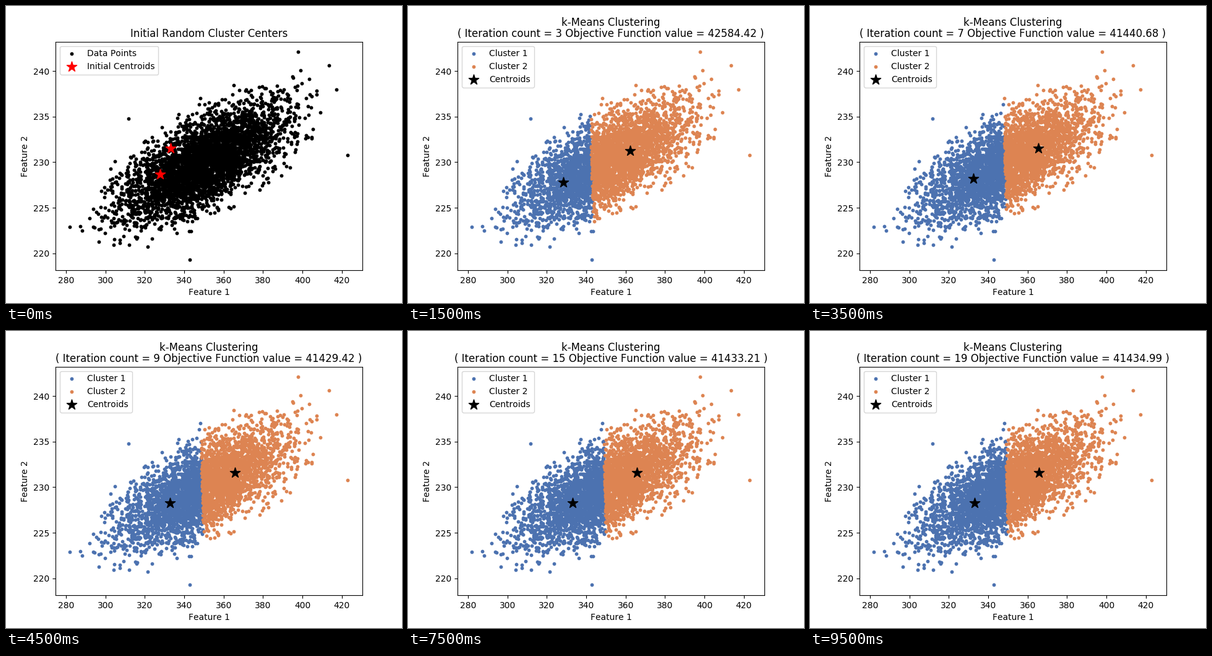
A matplotlib script for the animation above (10 s loop, 640 by 480 pixels).

```python
import numpy as np
import matplotlib.pyplot as plt
from matplotlib.animation import FuncAnimation

FRAMES, INTERVAL = 20, 500
BLUE, ORANGE = "#4C72B0", "#DD8452"

# Stray points that stand clear of the cloud
STRAYS = [(281.8, 222.9), (311.6, 234.8), (342.7, 219.3), (397.9, 242.1),
          (398.9, 240.1), (413.6, 240.6), (417.1, 238.0), (423.0, 230.8)]

# Each centroid closes a constant share of its gap per iteration
INITIAL = np.array([(327.8, 228.7), (333.0, 231.55)])
SETTLED = np.array([(333.0, 228.3), (365.75, 231.6)])
FIRST_GAP = np.array([(-12.5, -1.4), (-9.0, -0.85)])
DECAY = 0.615

# Objective at a few iterations, as a height above the floor
COST_FLOOR = 41428
COST_KEYS = {1: 7501.93, 3: 1156.42, 5: 113.24, 9: 1.42, 15: 5.21, 19: 6.99}


def make_points(count=4000, mean=(349.5, 230.0), sd=(20.4, 3.1), rho=0.665):
    z = np.random.default_rng(7).standard_normal((count, 2))
    z = z[np.hypot(*z.T) < 3.1]
    x = z[:, 0]
    y = rho * x + np.sqrt(1 - rho ** 2) * z[:, 1]
    cloud = np.column_stack([x, y]) * sd + mean
    return np.vstack([cloud, STRAYS])


def centroids(step):
    if step == 0:
        return INITIAL
    return SETTLED + FIRST_GAP * DECAY ** (step - 1)


def objective(step):
    heights = np.log(list(COST_KEYS.values()))
    return COST_FLOOR + np.exp(np.interp(step, list(COST_KEYS), heights))


def nearest(points, centers):
    gaps = points[:, None, :] - centers[None, :, :]
    return np.hypot(gaps[..., 0], gaps[..., 1]).argmin(axis=1)


def dots(points, color, label):
    ax.scatter(*points.T, s=10, c=color, label=label)


def stars(centers, color, label):
    ax.scatter(*centers.T, s=150, marker="*", c=color, label=label)


def draw(step):
    ax.clear()
    if step == 0:
        title = "Initial Random Cluster Centers"
        dots(POINTS, "black", "Data Points")
        stars(INITIAL, "red", "Initial Centroids")
    else:
        title = ("k-Means Clustering\n( Iteration count = "
                 f"{step} Objective Function value = {objective(step):.2f} )")
        labels = nearest(POINTS, centroids(step - 1))
        for k, color in enumerate((BLUE, ORANGE)):
            dots(POINTS[labels == k], color, f"Cluster {k + 1}")
        stars(centroids(step), "black", "Centroids")
    ax.set_title(title, pad=5.2, linespacing=1.0)
    ax.set(xlim=(274.6, 430.45), ylim=(218.13, 243.24),
           xlabel="Feature 1", ylabel="Feature 2")
    ax.legend(loc="upper left")
    return []


POINTS = make_points()
plt.rcParams.update({"font.family": "DejaVu Sans", "text.kerning_factor": 6})
fig, ax = plt.subplots(figsize=(6.4, 4.8), dpi=100)
anim = FuncAnimation(fig, draw, frames=FRAMES, init_func=lambda: [],
                     interval=INTERVAL, repeat=True, repeat_delay=0)
plt.show()
```
